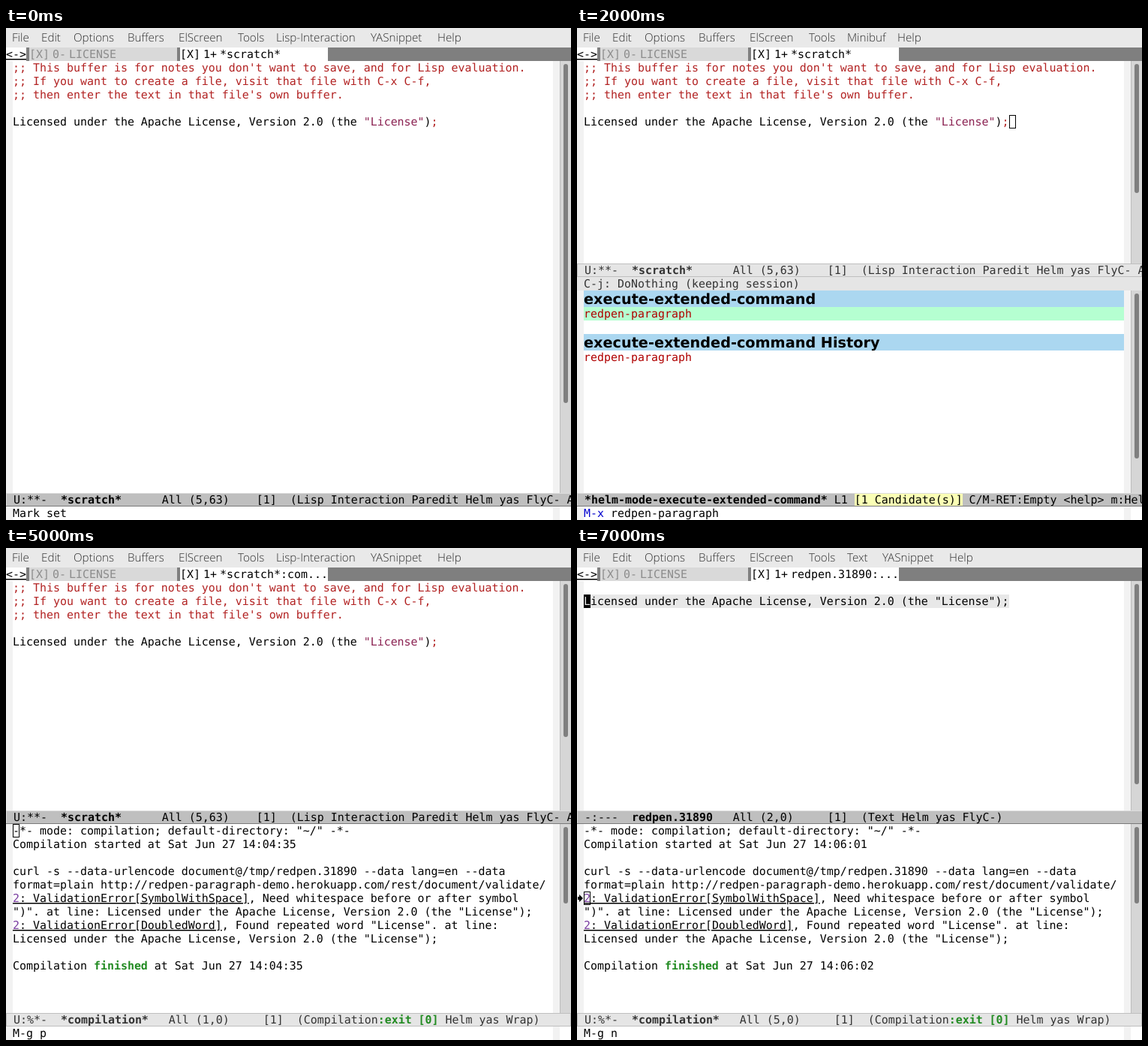
Animation, 753 px wide and 656 px high, one loop 8 s. Source, as an HTML page:

```html
<!DOCTYPE html>
<html lang="en">
<head>
<meta charset="utf-8">
<title>Editor session</title>
<style>
  html, body { margin: 0; width: 100%; height: 100%; overflow: hidden; background: #fff; }
  svg { display: block; }
  text { font: 14.95px "DejaVu Sans Mono", monospace; white-space: pre; text-rendering: geometricPrecision; }
  .menu { font: 300 15.2px "Open Sans", sans-serif; fill: #303030; }
  .head { font: bold 19.25px "DejaVu Sans", sans-serif; }
  .b { font-weight: bold; }
  .u { text-decoration: underline; }
  .dim { fill: #8c8c8c; }
  .soft { fill: #333; }
  .comment { fill: #b22222; }
  .string { fill: #8b2252; }
  .match { fill: #b00000; }
  .prompt { fill: #0000cd; }
  .ok { fill: #228b22; font-weight: bold; }
  .num { fill: #7a3fa0; }
</style>
</head>
<body>
<svg id="stage" width="753" height="656" viewBox="0 0 753 656"></svg>
<script>
const CELL = 9, ROW = 18;
const stage = document.getElementById('stage');

const rect = (x, y, w, h, fill, extra = '') =>
  `<rect x="${x}" y="${y}" width="${w}" height="${h}" fill="${fill}" ${extra}/>`;
const text = (x, top, s, cls = '') => `<text x="${x}" y="${top + 14}" class="${cls}">${s}</text>`;
const span = (cls, s) => `<tspan class="${cls}">${s}</tspan>`;
const lines = (top, list) => list.map((s, i) => text(9, top + i * ROW, s)).join('');
const block = (x, y) => rect(x, y, CELL, ROW, '#000');
const hollow = (x, y) => rect(x + .5, y + .5, CELL - 1, ROW - 1, 'none', 'stroke="#000"');
const arrow = y => `<path d="M1 ${y + 7}h2v-3l5 5l-5 5v-3h-2z"/>`;

function menuBar(extra) {
  const xs = { File: 8, Edit: 47, Options: 90, Buffers: 162, ElScreen: 230, Tools: 309, ...extra };
  return rect(0, 0, 753, 26, '#e9e9e9') +
    Object.entries(xs).map(([s, x]) => text(x, 4, s, 'menu')).join('');
}

function tabBar(name) {
  const tab = (x, id, label, cls) =>
    text(x, 26, '[X]', cls) + text(x + 31, 26, id, cls) + text(x + 53, 26, label, cls);
  return rect(0, 26, 753, ROW, '#7f7f7f') + rect(0, 26, 27, ROW, '#fff') +
    rect(31, 26, 197, ROW, '#d9d9d9') + rect(232, 26, 197, ROW, '#fff') +
    text(0, 26, '&lt;->', 'u') + tab(31, '0-', 'LICENSE', 'dim') + tab(232, '1+', name);
}

// Fringes and scroll bar around one window
const pane = (top, bottom, thumbTop, thumbEnd) =>
  rect(0, top, 9, bottom - top, '#f2f2f2') + rect(729, top, 9, bottom - top, '#f2f2f2') +
  rect(738, top, 15, bottom - top, '#d6d6d6') + rect(738, top, 1, bottom - top, '#bcbcbc') +
  rect(743, thumbTop, 6, thumbEnd - thumbTop, '#7f7f7f', 'rx="3"');

function modeLine(top, active, s) {
  const box = active
    ? rect(0, top, 753, ROW, '#bfbfbf') + rect(0, top, 753, 1, '#dcdcdc') +
      rect(0, top, 1, ROW, '#dcdcdc') + rect(0, top + 17, 753, 1, '#7a7a7a')
    : rect(0, top, 753, ROW, '#e5e5e5') +
      rect(.5, top + .5, 752, 17, 'none', 'stroke="#bfbfbf"');
  return box + text(10, top, s, active ? '' : 'soft');
}

const echo = s => rect(0, 638, 9, ROW, '#f2f2f2') + rect(729, 638, 9, ROW, '#f2f2f2') + text(9, 638, s);

const LICENSE = 'Licensed under the Apache License, Version 2.0 (the "License");';
const LISP_MENU = { 'Lisp-Interaction': 360, YASnippet: 486, Help: 575 };
const TEXT_MENU = { Text: 360, YASnippet: 407, Help: 496 };
const HELM_MENU = { Minibuf: 360, Help: 427 };

const scratch = (bottom, thumbEnd, active) =>
  pane(44, bottom, 48, thumbEnd) + lines(44, [
    span('comment', ";; This buffer is for notes you don't want to save, and for Lisp evaluation."),
    span('comment', ';; If you want to create a file, visit that file with C-x C-f,'),
    span('comment', ";; then enter the text in that file's own buffer."),
    '',
    'Licensed under the Apache License, Version 2.0 (the ' +
      span('string', '"License"') + ')' + span('comment', ';')
  ]) + modeLine(bottom, active, 'U:**-  ' + span('b', '*scratch*') +
    '      All (5,63)    [1]  (Lisp Interaction Paredit Helm yas FlyC- Abbrev)');

const heading = (top, s) =>
  rect(9, top, 720, 22, '#abd7f0') + `<text x="9" y="${top + 18}" class="head">${s}</text>`;

const helm = (count, thumbEnd, body, input) =>
  menuBar(HELM_MENU) + tabBar('*scratch*') + scratch(314, 220, false) + hollow(576, 116) +
  rect(0, 332, 753, ROW, '#e5e5e5') + text(9, 332, 'C-j: DoNothing (keeping session)', 'soft') +
  pane(350, 620, 354, thumbEnd) + heading(350, 'execute-extended-command') +
  rect(9, 372, 720, ROW, '#b5ffd1') + body +
  modeLine(620, true, '') +
  rect(370, 621, (count.length + 15) * CELL, 16, '#faffb5') +
  text(10, 620, span('b', '*helm-mode-execute-extended-command*') +
    ` L1 [${count} Candidate(s)] C/M-RET:Empty &lt;help> m:Helm`) +
  echo(span('prompt', 'M-x ') + input);

const candidates = ('ccc-set-buffer-local-cursor-color gnus-score-mode desktop-save-in-desktop-dir ' +
  'yas/about package-refresh-contents save-buffers-kill-terminal format-find-file dired-view-file ' +
  'ido-save-history indent-rigidly-right-to-tab-stop remember-clipboard minimize-window ' +
  'popwin:popup-last-buffer completion-list-mode').split(' ');

const error = (kind, rest) =>
  span('u', span('num', '2') + `: ValidationError[${kind}]`) + ', ' + rest;

function compilation(start, end, point) {
  const output = [
    '-*- mode: compilation; default-directory: "~/" -*-',
    'Compilation started at Sat Jun 27 ' + start,
    '',
    'curl -s --data-urlencode document@/tmp/redpen.31890 --data lang=en --data',
    'format=plain http://redpen-paragraph-demo.herokuapp.com/rest/document/validate/'
  ];
  if (end) output.push(
    error('SymbolWithSpace', 'Need whitespace before or after symbol'),
    '")". at line: ' + LICENSE,
    error('DoubledWord', 'Found repeated word "License". at line:'),
    LICENSE,
    '',
    `Compilation ${span('ok', 'finished')} at Sat Jun 27 ${end}`
  );
  const cursorY = 368 + point * ROW;
  return pane(368, 620, 372, 474) + lines(368, output) + hollow(9, cursorY) +
    (point ? arrow(cursorY) : '') +
    modeLine(620, false, 'U:%*-  ' + span('b', '*compilation*') +
      `   All (${point || 1},0)     [1]  (Compilation` +
      (end ? span('ok', ':exit [0]') : span('b', ':run')) + ' Helm yas Wrap)');
}

const compiled = (end, point, message, cursor = '') =>
  menuBar(LISP_MENU) + tabBar('*scratch*:com...') + scratch(350, 252, true) + cursor +
  compilation('14:04:35', end, point) + echo(message);

const visited = () =>
  menuBar(TEXT_MENU) + tabBar('redpen.31890:...') + pane(44, 350, 48, 315) +
  rect(9, 62, 567, ROW, '#e8e8e8') + text(9, 62, LICENSE) +
  block(9, 62) + `<text x="9" y="76" fill="#e8e8e8">L</text>` +
  modeLine(350, true, '-:---  ' + span('b', 'redpen.31890') +
    '   All (2,0)     [1]  (Text Helm yas FlyC-)') +
  compilation('14:06:01', '14:06:02', 5) + echo('M-g n');

const match = span('match', 'redpen-paragraph');
const scenes = [
  () => menuBar(LISP_MENU) + tabBar('*scratch*') + pane(44, 620, 48, 500) +
    scratch(620, 500, true) + echo('Mark set'),
  () => helm('100', 400, lines(372, candidates), '') + block(45, 638),
  () => helm('1', 574, text(9, 372, match) +
    heading(408, 'execute-extended-command History') + text(9, 430, match), 'redpen-paragraph'),
  () => compiled('', 0, ''),
  () => compiled('14:04:35', 0, 'Compilation finished'),
  () => compiled('14:04:35', 0, 'M-g p'),
  () => compiled('14:04:35', 5, 'Moved back before first error', block(576, 116)),
  visited
];

let shown = -1;
function tick() {
  const index = Math.floor(performance.now() / 1000) % scenes.length;
  if (index !== shown) {
    shown = index;
    stage.innerHTML = rect(0, 0, 753, 656, '#fff') + scenes[index]();
  }
  requestAnimationFrame(tick);
}
tick();
</script>
</body>
</html>
```
